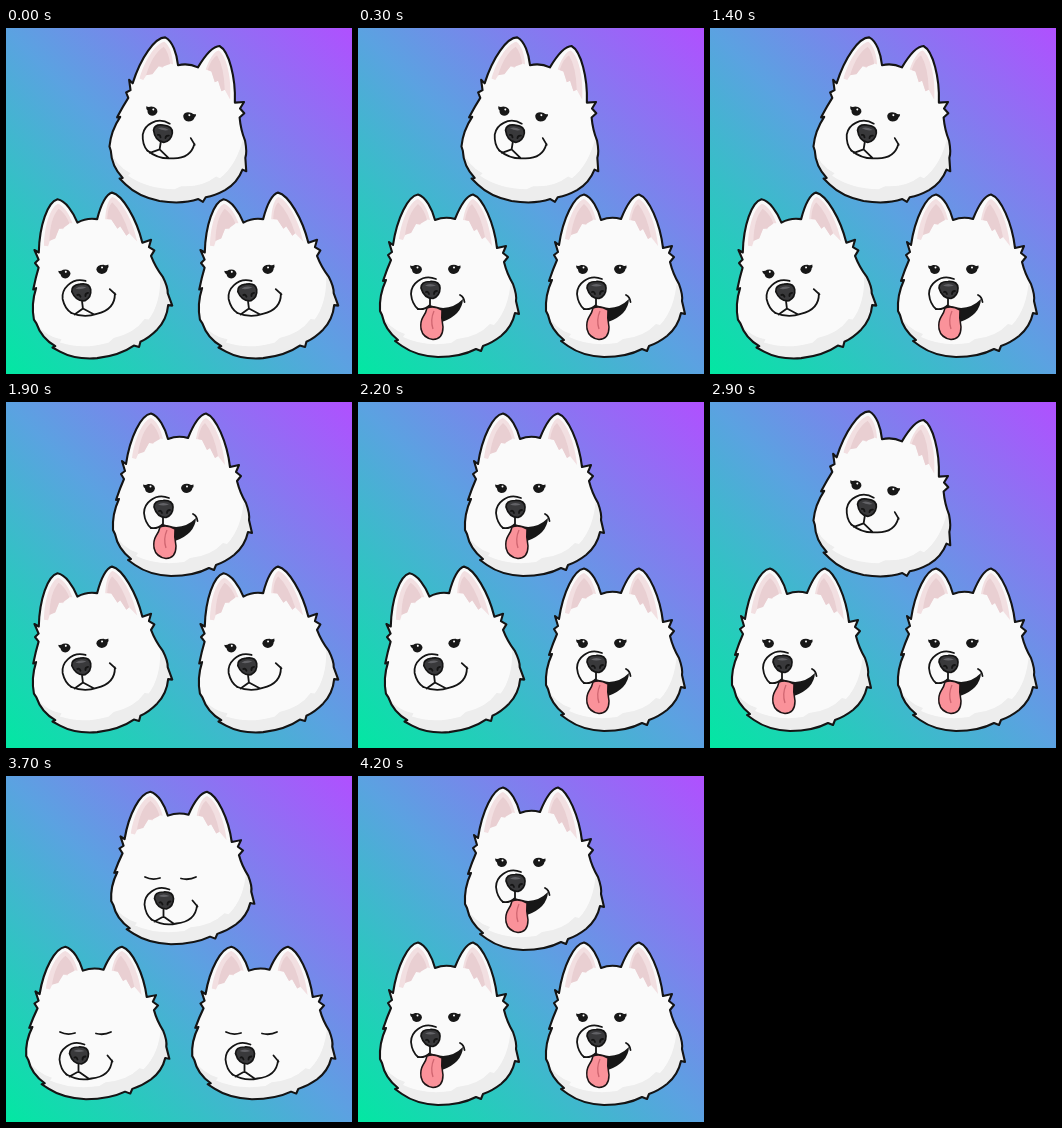
Write an HTML page that moves like this. It is 346 by 346 pixels and loops after 4.4 s.

```html
<!DOCTYPE html>
<html lang="en">
<head>
<meta charset="utf-8">
<title>Three dogs</title>
<style>
html, body { margin: 0; width: 100%; height: 100%; overflow: hidden; }
svg { display: block; width: 100vw; height: 100vh; }
.line { fill: none; stroke: #141414; stroke-width: 1.8; stroke-linecap: round; stroke-linejoin: round; }
.edge { stroke-width: 2.1; }
</style>
</head>
<body>
<svg viewBox="0 0 346 346">
<defs>
  <linearGradient id="sky" x1="0" y1="1" x2="1" y2="0">
    <stop offset="0" stop-color="#02e8a2"/>
    <stop offset=".5" stop-color="#5ba2e1"/>
    <stop offset="1" stop-color="#b050ff"/>
  </linearGradient>

  <path id="outline" d="M120 62C124 35 135 13 145 11.500C153 14 159 26 162 37Q172 33 182 36
    C186 26 192 13 200 11.500C210 15 221 40 224 65L233 63L230 70L235 74L231 79Q234 91 240 101
    Q244 112 243 118L246 131L242 130Q239 144 228 153Q219 160 210 163L208 168L203 166
    Q188 174 165 174Q143 173 129 163L122 158L125 157Q112 147 109 132L107 128
    Q106 112 113 97L110 98Q114 86 118 77L115 72L119 69L116 59Z"/>
  <clipPath id="inside"><use href="#outline"/></clipPath>

  <g id="head">
    <use href="#outline" fill="#fafafa"/>
    <path clip-path="url(#inside)" fill="#ededed" d="M105 126Q115 146 132 151L130 154Q151 164 178 160L184 156Q205 154 217 141L221 142Q236 126 238 96L255 100V180H105Z"/>
    <path fill="#f2dfe1" d="M126 56C129 34 138 18 145 16C151 19 155 28 157 37L151 36L147 42L143 41L138 50L134 48L130 57ZM190 37C192 25 196 17 200 16C208 20 217 40 219 63L212 54L209 56L204 46L201 48L196 38Z"/>
    <path fill="#e9cfd2" d="M132 52Q135 30 145 21Q151 26 154 37L147 41L143 41L138 50ZM192 37Q194 25 199 21Q208 32 212 54L209 56L204 46L201 48L196 38Z"/>
    <use href="#outline" class="line edge"/>
  </g>

  <g id="nose">
    <path fill="#39393b" stroke="#141414" stroke-width="1.700" d="M148 105Q148 98.500 157 98.500Q166.500 98 167 105Q167 113 160 115.500Q151 115.500 148 105Z"/>
    <path fill="#626266" d="M152 102.500Q157 99.500 163 102.500Q157 104.500 152 102.500Z"/>
    <path class="line" d="M153 109Q155 108 156 111M164 108Q161 108 161 111"/>
  </g>

  <g id="eyes" fill="#171717">
    <path d="M137 82.500Q139.500 83.500 142 82Q148.500 81.500 149 86.500Q148 91 143 91Q139 90 139 86.500Q137 85 137 82.500Z"/>
    <path d="M187.500 82.500Q185 83.500 183 82Q176 81 175 86Q176 91 181 91Q186 90 186.500 86Q188 85 187.500 82.500Z"/>
    <circle cx="144.500" cy="84.500" r="1" fill="#fff"/>
    <circle cx="181" cy="84.500" r="1" fill="#fff"/>
  </g>

  <path id="ring" class="line" d="M163 96Q153 92 145 98Q138 103 138 111Q139 121 145 126"/>

  <g id="smile">
    <use href="#ring"/>
    <path class="line" d="M145 126Q157 133 170 130Q189 128 190.500 112M186 107L191 113M157 116V123M148 128L157 123L167 130"/>
    <use href="#nose"/>
  </g>

  <g id="A"><use href="#head"/><use href="#eyes"/><use href="#smile"/></g>

  <g id="B">
    <use href="#head"/><use href="#eyes"/><use href="#ring"/>
    <path fill="#171717" d="M157 122Q176 130 190 116Q189 132 169 139L153 128Z"/>
    <path class="line" d="M145 126Q152 127 157 122V116M187 112Q191 114 191.500 119"/>
    <path fill="#fa929a" stroke="#1d1415" stroke-width="1.500" d="M154 125Q161 122 169 127Q168 135 170 144Q170 156 160 156.500Q150 155 148 146Q147 139 150 134Q153 130 154 125Z"/>
    <path fill="none" stroke="#cf6570" stroke-width="1.300" d="M161 128Q157 137 160 146"/>
    <use href="#nose"/>
  </g>

  <g id="C">
    <use href="#head" transform="matrix(1.03 0 0 .938 -5 5)"/>
    <use href="#smile" transform="translate(.5 17.500)"/>
    <path class="line" d="M139 101Q146 104.500 154 102M175 102.500Q183 104.500 190 101"/>
  </g>
</defs>

<rect width="346" height="346" fill="url(#sky)"/>
<use class="dog"/><use class="dog"/><use class="dog"/>
</svg>
<script>
// A head tilted, B tongue out, C eyes shut; order: top, left, right
const round = [[200, 'BAA'], [100, 'ABB'], [500, 'BAB'], [200, 'BBA'], [100, 'ABB'], [200, 'BAB'], [500, 'AAB']];
const beats = [[100, 'AAA'], ...round, ...round, [500, 'CCC'], [200, 'BBB']];
const total = beats.reduce((sum, [ms]) => sum + ms, 0);
const places = [[0, 0], [-85, 155], [81, 155]];
const dogs = document.querySelectorAll('.dog');

function posesAt(time) {
  for (const [ms, poses] of beats) {
    if (time < ms) return poses;
    time -= ms;
  }
}

function tilt(pose, i) {
  if (pose !== 'A') return '';
  return i ? 'translate(2 .5) rotate(-7 175 100)' : 'translate(0 1.5) rotate(9 175 100)';
}

let shown;
function draw(now) {
  const poses = posesAt(now % total);
  if (poses === shown) return;
  shown = poses;
  dogs.forEach((dog, i) => {
    dog.setAttribute('href', '#' + poses[i]);
    dog.setAttribute('transform', `translate(${places[i]}) ${tilt(poses[i], i)}`);
  });
}

const start = performance.now();
function tick() {
  draw(performance.now() - start);
  requestAnimationFrame(tick);
}
tick();
</script>
</body>
</html>
```
